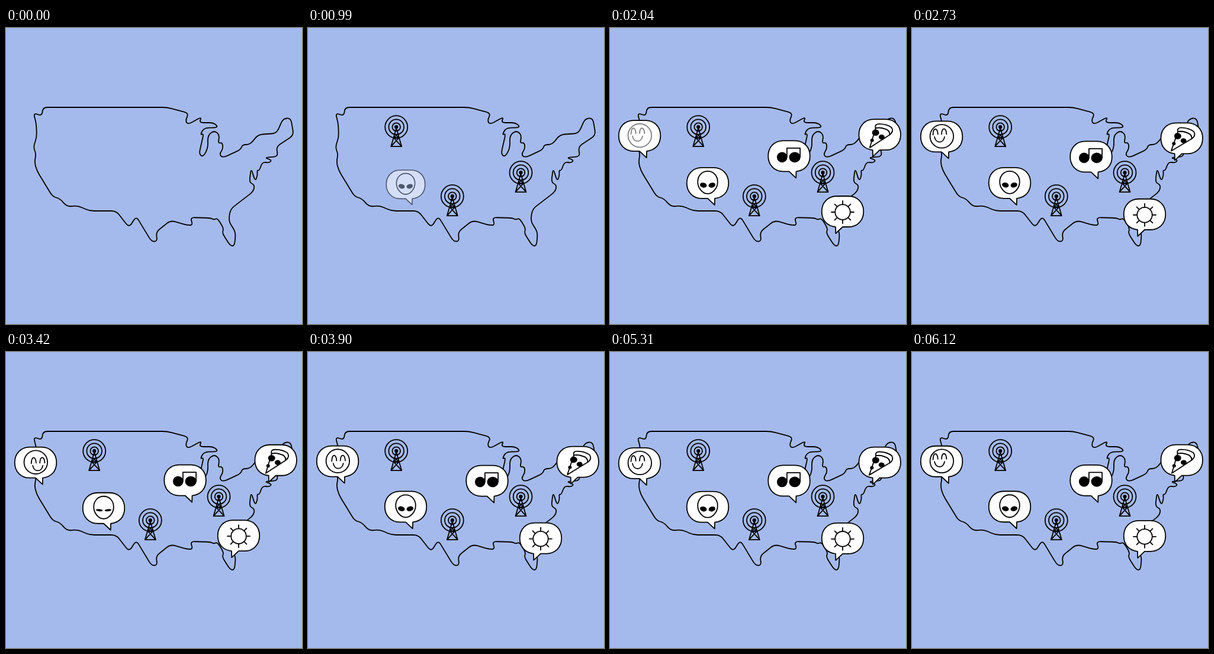
These frames come from a looping animation (500x500 px, 6330 ms). An HTML page:

```html
<!DOCTYPE html>
<html lang="en">
<head>
<meta charset="utf-8">
<title>Signals across the map</title>
<style>
  html, body { margin: 0; width: 100%; height: 100%; overflow: hidden; background: #a5baec; }
  svg { display: block; width: 100vw; height: 100vh; }
  .line { fill: none; stroke: #000; stroke-width: 1.8; stroke-linejoin: round; stroke-linecap: round; }
  .paper { fill: #fff; }
  .ink { fill: #000; }
</style>
</head>
<body>
<svg id="stage" viewBox="0 0 500 500">
  <path id="coast" class="line"/>
</svg>
<script>
const LOOP = 6330, LAST = 6120, STEP = 30;
const stage = document.getElementById('stage');

const coast = `46,143 61,149 62,134 272,134 309,144 303,156 307,163 331,150 326,160 351,160
  359,168 334,169 328,181 334,178 326,213 333,218 341,203 341,181 352,173 361,181 358,195 365,193
  367,203 360,214 367,219 397,205 399,197 412,197 426,180 457,178 468,153 481,152 486,181
  456,201 460,217 436,219 449,223 445,228 433,226 428,241 424,240 425,249 421,259 414,237
  411,261 420,265 418,276 379,306 376,326 388,345 386,368 379,368 365,346 368,339 357,321
  351,324 346,321 311,320 316,333 306,333 278,325 253,345 256,360 246,361 220,318
  208,337 186,309 141,309 121,300 103,302 91,288 79,285 52,241 48,226 51,213`;
const shore = '46,201 52,185 51,160';

// Closed polygon with softened corners
function soften(text, r) {
  const p = text.trim().split(/\s+/).map(s => s.split(',').map(Number));
  const toward = (a, b) => {
    const len = Math.hypot(b[0] - a[0], b[1] - a[1]);
    const k = Math.min(r, len / 2) / len;
    return [a[0] + (b[0] - a[0]) * k, a[1] + (b[1] - a[1]) * k];
  };
  return p.map((c, i) => {
    const before = toward(c, p[(i + p.length - 1) % p.length]);
    const after = toward(c, p[(i + 1) % p.length]);
    return `${i ? 'L' : 'M'}${before}Q${c} ${after}`;
  }).join('') + 'Z';
}
document.getElementById('coast').setAttribute('d', soften(coast + ' ' + shore, 8));

function group(parent, markup) {
  const g = document.createElementNS('http://www.w3.org/2000/svg', 'g');
  g.innerHTML = markup;
  parent.appendChild(g);
  return g;
}
const line = (d, cls = '') => `<path class="line ${cls}" d="${d}"/>`;
const ring = (x, y, r) => `<circle class="line" cx="${x}" cy="${y}" r="${r}"/>`;
const dot = (x, y, rx, ry = rx) => `<ellipse class="ink" cx="${x}" cy="${y}" rx="${rx}" ry="${ry}"/>`;

const towers = [[149.2, 167.2], [243.8, 284.2], [359.5, 244.2]].map(([x, y]) => {
  const g = group(stage, '');
  g.setAttribute('transform', `translate(${x} ${y})`);
  const mast = group(g, dot(0, 0, 3.1) +
    line('M0 2L-9 33H9L0 2M-4.6 18H4.6L-9 33M-4.6 18L9 33M-2.8 11.5L4.6 18M2.8 11.5L-4.6 18'));
  const rings = [6.8, 12.8, 19].map(r => group(g, ring(0, 0, r)));
  return { mast, rings };
});

const balloon = side => `<path class="line paper" transform="scale(${side} 1)"
  d="M-10 0H10C25 0 35.3 11 35.3 26C35.3 41 26 50.5 12 52L11.7 63L0 52H-10C-25 52 -35.3 41 -35.3 26C-35.3 11 -25 0 -10 0Z"/>`;

const rays = [...Array(8).keys()].map(i => {
  const a = i * Math.PI / 4, c = Math.cos(a), s = Math.sin(a);
  return `M${c * 13.5} ${27 + s * 13.5}L${c * 19} ${27 + s * 19}`;
}).join('');

const icons = {
  alien: line('M0 6C10 6 16.8 14 16.8 24C16.8 35 8 44 0 44C-8 44 -16.8 35 -16.8 24C-16.8 14 -10 6 0 6Z') +
    '<g class="eyes">' +
    [-1, 1].map(s => `<g transform="translate(${s * 7.3} 0) rotate(${s * -15})">${dot(0, 0, 5.8, 4.1)}</g>`).join('') + '</g>',
  music: dot(-11.8, 28, 8.8) + dot(9.6, 28, 9.6, 8.8) + line('M-3.6 28V12.5H18.6V28'),
  sun: ring(0, 27, 12.8) + line(rays),
  pizza: '<g class="slice">' + line('M-7 15L-17 48L17 26Q17 18 8 16Q0 13 -7 15Z', 'paper') +
    line('M-7 15Q-9 8 -1 8Q12 8 20 14Q24 21 17 26Q17 18 8 16Q0 13 -7 15Z', 'paper') +
    dot(-7, 22.5, 6, 5.4) + dot(3.2, 30, 5, 4.2) + dot(-13, 35.5, 3, 2.8) + '</g>',
  smile: '<g class="face">' + ring(0.3, 25.5, 19.8) + '<g class="look">' +
    line('M-14.5 23C-14 10 -7 10 -6.3 22M0 22C0.5 10 7.5 10 8.3 22M-12 26.5C-10 38 3 38 5 26.5') + '</g></g>'
};

// top: resting height, amp and period: bobbing, peak: time at the lowest point,
// lift: extra height that settles away
const bubbles = [
  { kind: 'alien', x: 165, side: 1, start: 900, top: 236.4, amp: 1.4, period: 1100, peak: 3475, lift: 0 },
  { kind: 'sun', x: 393, side: -1, start: 1080, top: 286.4, amp: 2.4, period: 1300, peak: 2690, lift: 0 },
  { kind: 'music', x: 302.5, side: 1, start: 1230, top: 190.9, amp: 0.7, period: 1300, peak: 2560, lift: 0 },
  { kind: 'pizza', x: 455.7, side: -1, start: 1410, top: 158.8, amp: 2.2, period: 1300, peak: 2846, lift: 3 },
  { kind: 'smile', x: 50, side: 1, start: 1860, top: 160, amp: 2.2, period: 1100, peak: 3200, lift: 6 }
];
for (const b of bubbles) b.el = group(stage, balloon(b.side) + icons[b.kind]);

const part = name => stage.querySelector('.' + name);
const eyes = part('eyes'), slice = part('slice'), face = part('face'), look = part('look');

const ramp = (t, a, b) => Math.min(1, Math.max(0, (t - a) / (b - a)));
const ease = k => k * k * (3 - 2 * k);
const fade = (el, k) => el.setAttribute('opacity', k);
const move = (el, v) => el.setAttribute('transform', v);

function draw(t) {
  towers.forEach(({ mast, rings }, i) => {
    fade(mast, ramp(t, i * 90, i * 90 + 120));
    rings.forEach((r, j) => fade(r, ramp(t, 570 + j * 45, 630 + j * 45)));
  });

  for (const b of bubbles) {
    const k = ramp(t, b.start, b.start + 170);
    const wave = Math.cos(2 * Math.PI * (t - b.peak) / b.period);
    const y = b.top + b.amp * wave - b.lift * (1 - ease(ramp(t, 2040, 2900))) + 4 * (1 - k);
    fade(b.el, k);
    move(b.el, `translate(${b.x} ${y}) translate(0 26) scale(${0.85 + 0.15 * k}) translate(0 -26)`);
    if (b.kind === 'pizza') move(slice, `rotate(${1 + 1.5 * wave} 0 26)`);
  }

  const shut = ramp(t, 3300, 3390) - ramp(t, 3450, 3540);
  move(eyes, `translate(0 29.5) scale(1 ${1 - 0.55 * shut})`);

  fade(face, ramp(t, 1980, 2100));
  const turn = ease(ramp(t, 2880, 3180)) - ease(ramp(t, 3780, 4080));
  move(look, `translate(${7.2 * turn} ${4.6 * turn})`);
}

function tick() {
  const t = performance.now() % LOOP;
  draw(Math.min(LAST, Math.floor(t / STEP) * STEP));
  requestAnimationFrame(tick);
}
tick();
</script>
</body>
</html>
```
